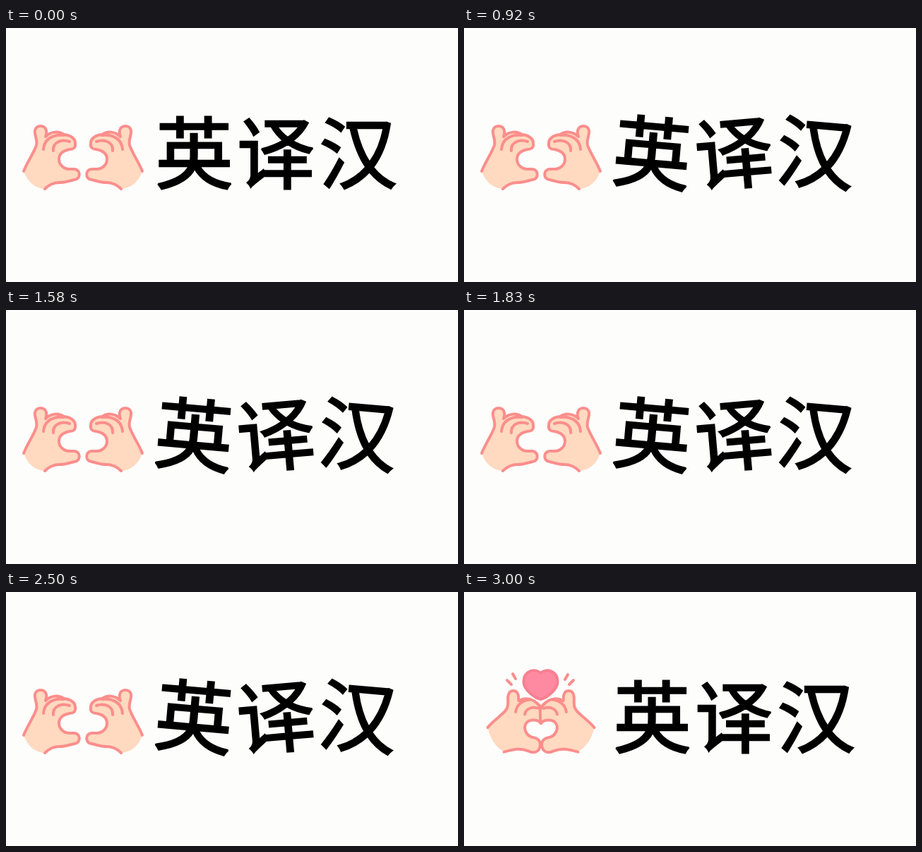
An HTML page for the animation above (3080 ms loop, 640 px wide and 360 px high).

```html
<!DOCTYPE html>
<html lang="zh-CN">
<head>
<meta charset="utf-8">
<style>
  html, body { margin: 0; height: 100%; overflow: hidden; background: #fdfdfc; }
  svg { display: block; width: 100vw; height: 100vh; }
  text {
    font: 400 110.5px "Noto Sans CJK SC", "Noto Sans CJK", sans-serif;
    text-anchor: middle;
    fill: #000; stroke: #000; stroke-width: 2.6; stroke-miterlimit: 2;
  }
  .skin { fill: #ffd9c0; }
  .line { fill: none; stroke: #fb8e8c; stroke-width: 4; stroke-linecap: round; stroke-linejoin: round; }
  .heart { fill: #fe8aa2; stroke: #f87f90; stroke-width: 4; }
</style>
</head>
<body>
<svg viewBox="0 0 640 360">
  <defs>
    <g id="openHand"></g>
    <g id="closedHand"></g>
    <g id="squeezedHand"><use href="#closedHand" transform="rotate(1.5 107 215)"/></g>
    <path id="heart" class="heart"
      d="M0 20C-6 19-24 8-24-5C-24-20-8-25 0-17C8-25 24-20 24-5C24 8 6 19 0 20Z"/>
  </defs>

  <g id="apart">
    <use href="#openHand"/>
    <use href="#openHand" transform="matrix(-1 0 0 1 218 0)"/>
  </g>

  <g id="together">
    <use href="#closedHand"/>
    <use href="#closedHand" transform="matrix(-1 0 0 1 218 0)"/>
    <use href="#heart" x="111" y="132"/>
    <path class="line" d="M58 127L66 131M65 118L72 124M144 125L149 119M148 132L156 127"/>
  </g>

  <g id="squeeze">
    <use href="#squeezedHand"/>
    <use href="#squeezedHand" transform="matrix(-1 0 0 1 218 0)"/>
    <use href="#heart" x="108.5" y="132"/>
    <path class="line" d="M61 125L67 131M69 116L73 123M143 124L147 117M149 131L155 125"/>
  </g>

  <g id="title"></g>
</svg>
<script>
const LOOP = 3080;
const BEAT = 303;          // one round of the three hand poses
const STEP = BEAT / 3;
const TEXT_DELAY = 5;      // the title follows just after the hands open
const TILT = 5;
const POSES = ["apart", "together", "squeeze"];
const byId = id => document.getElementById(id);

// The wrist edge is filled but has no outline.
function buildHand(id, outline, wrist, creases) {
  byId(id).innerHTML =
    `<path class="skin" d="${outline}${wrist}Z"/><path class="line" d="${outline}${creases}"/>`;
}

buildHand("openHand",
  "M25 203C30 190 40 176 43 166C45 158 40 152 41 145C43 137 55 137 57 145" +
  "C58 149 57 151 56 154C64 146 75 146 82 151C92 152 98 157 98 163" +
  "C99 170 95 172 90 172C80 174 75 178 75 186C75 194 82 200 90 200" +
  "L97 200C106 201 106 214 97 215C88 217 84 219 76 219C68 219 62 221 55 228",
  "Q33 226 25 203",
  "M53 172C54 158 66 150 82 152M67 174C66 162 78 157 90 161");

buildHand("closedHand",
  "M33 194C42 182 55 175 59 167C63 159 59 153 61 147C63 139 73 139 75 147" +
  "C76 150 75 152 76 155C84 150 94 151 101 157C106 161 109 164 109 169" +
  "L109 186C103 180 91 180 87 187C83 194 88 204 96 206" +
  "C104 207 108 211 108 216C108 228 98 229 92 226C80 221 70 224 57 228",
  "Q39 218 33 194",
  "M72 171C73 160 82 154 92 153M85 174C86 166 95 162 104 165");

const glyphs = [["英", 266.5], ["译", 382], ["汉", 498.5]].map(([char, x], i) => {
  const node = document.createElementNS("http://www.w3.org/2000/svg", "text");
  node.textContent = char;
  node.setAttribute("x", x);
  node.setAttribute("y", 218.5);
  byId("title").append(node);
  return { node, x, sign: i % 2 ? -1 : 1 };
});

function draw() {
  const phase = performance.now() % LOOP % BEAT;

  const pose = POSES[Math.floor(phase / STEP)];
  for (const id of POSES)
    byId(id).setAttribute("display", id === pose ? "inline" : "none");

  const tilted = phase >= TEXT_DELAY && phase < TEXT_DELAY + STEP;
  for (const { node, x, sign } of glyphs)
    node.setAttribute("transform", `rotate(${tilted ? sign * TILT : 0} ${x} 177)`);

  requestAnimationFrame(draw);
}
draw();
</script>
</body>
</html>
```
